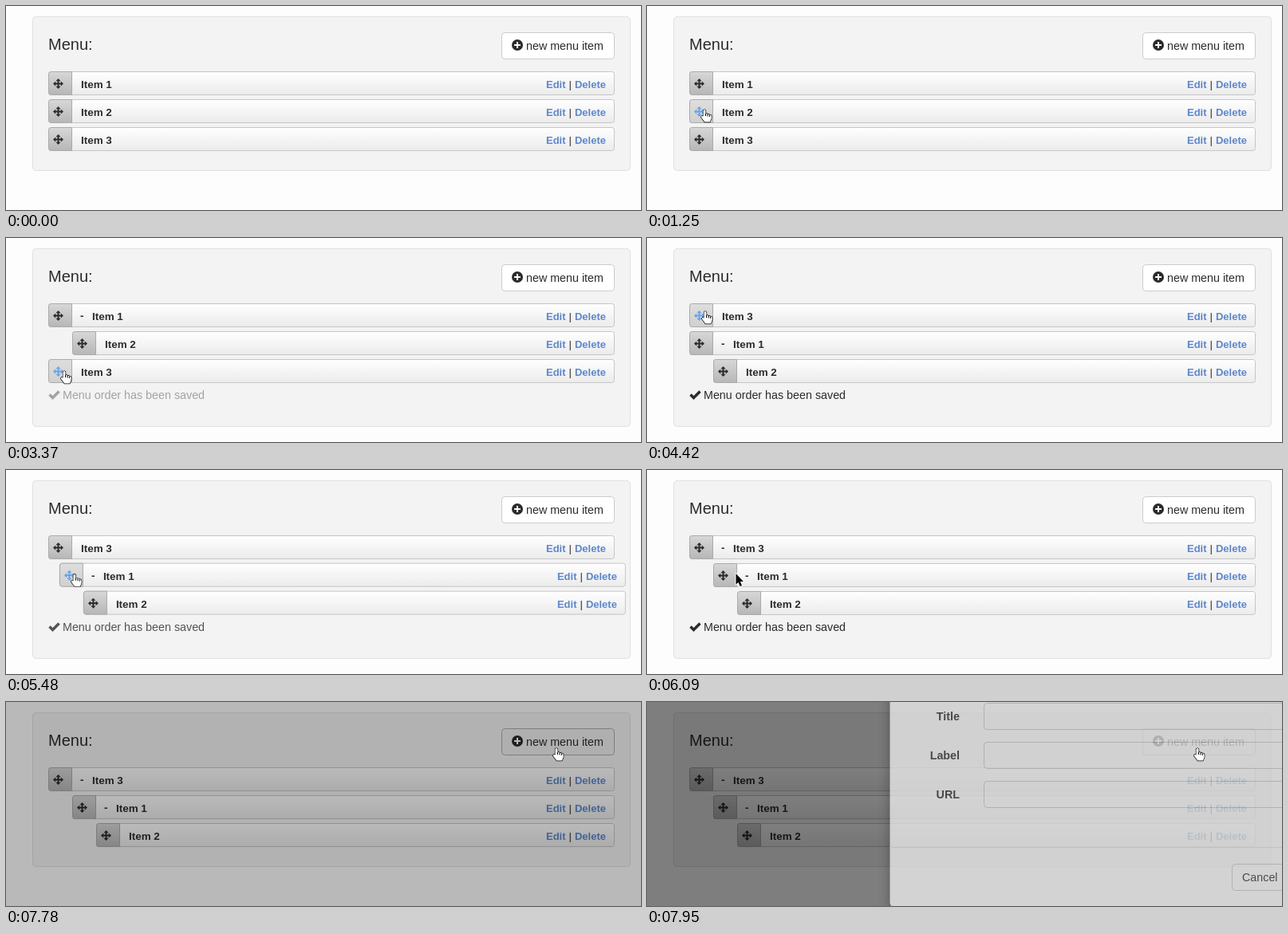
These frames come from a looping animation (796x256 px, 8000 ms). An HTML page with a canvas:

```html
<!DOCTYPE html>
<html lang="en">
<head>
<meta charset="utf-8">
<title>Sortable menu</title>
<style>
html, body { margin: 0; width: 100%; height: 100%; overflow: hidden; background: #fdfdfd; }
canvas { display: block; }
</style>
</head>
<body>
<canvas id="stage" width="796" height="256"></canvas>
<script>
const LOOP = 8000, TICK = 88.25;
const FONT = '"Liberation Sans", Arial, sans-serif';
const INK = '#2b2b2b', LINK = '#5d87cb', HOVER = '#69a5e6';
const LEFT = 53, RIGHT = 763, TOP = 82, ROW = 35, INDENT = 30;

const ARROW = new Path2D('M0 0V13.6L3 10.9 5.2 16 7.5 15 5.4 10.1H9.4Z');
const HAND = new Path2D('M-1.5 8.5V1.2Q0-1 1.5 1.2V5.3Q3.2 4.3 4 6 5.6 5 6.4 6.7 8.6 6 8.7 8.5V11L7 15.5H.3L-4.2 9.6Q-4.2 7-1.5 8.5Z');

// times in ticks
const POINTER = [
  [5, 185, 78], [6, 100, 27], [8, 100, 27], [14, 72, 130], [15, 72, 130],
  [22, 117, 128], [26, 117, 128], [32, 73, 167], [38, 73, 167],
  [43, 72, 54], [45, 72, 66], [46, 72, 66], [50, 73, 92], [55, 73, 92],
  [60, 72, 131], [65, 111.5, 130], [74, 111.5, 130], [84, 690, 58]
];
const STATUS = [
  [23, 0], [25, 1], [35, 1], [40, 0], [46, 0], [49, 1],
  [61, 1], [66, 0], [69, 1], [80, 1], [85, 0]
];
// rows: [number, depth, has children]; drag: start tick, first and last row moved
const PHASES = [
  { end: 23, rows: [[1, 0], [2, 0], [3, 0]], drag: [15, 1, 1] },
  { end: 46, rows: [[1, 0, true], [2, 1], [3, 0]], drag: [38, 2, 2] },
  { end: 66, rows: [[3, 0], [1, 0, true], [2, 1]], drag: [60, 1, 2] },
  { end: 99, rows: [[3, 0, true], [1, 1, true], [2, 2]] }
];

const clamp = (v, lo, hi) => Math.min(hi, Math.max(lo, v));
const linear = u => u;
const smooth = u => u * u * (3 - 2 * u);

function at(keys, n, ease) {
  const i = keys.findIndex(k => k[0] > n);
  if (i < 0) return keys[keys.length - 1].slice(1);
  if (i === 0) return keys[0].slice(1);
  const a = keys[i - 1], b = keys[i];
  const u = ease((n - a[0]) / (b[0] - a[0]));
  return a.slice(1).map((v, j) => v + (b[j + 1] - v) * u);
}

const stage = document.getElementById('stage');
let ctx = stage.getContext('2d');

function box(x, y, w, h, r, fill, line) {
  ctx.beginPath();
  ctx.roundRect(x + .5, y + .5, w - 1, h - 1, r);
  ctx.fillStyle = fill;
  ctx.fill();
  if (line) {
    ctx.strokeStyle = line;
    ctx.lineWidth = 1;
    ctx.stroke();
  }
}

function text(s, x, y, size, color = INK, weight = 'normal', align = 'left') {
  ctx.font = `${weight} ${size}px ${FONT}`;
  ctx.textAlign = align;
  ctx.fillStyle = color;
  ctx.fillText(s, x, y);
}

function shade(y, from, to) {
  const g = ctx.createLinearGradient(0, y, 0, y + 30);
  g.addColorStop(0, from);
  g.addColorStop(1, to);
  return g;
}

function moveIcon(x, y, color) {
  ctx.save();
  ctx.translate(x, y);
  ctx.fillStyle = color;
  for (let i = 0; i < 4; i++) {
    ctx.fillRect(-1, -5, 2, 5);
    ctx.beginPath();
    ctx.moveTo(0, -6.5);
    ctx.lineTo(3, -3.3);
    ctx.lineTo(-3, -3.3);
    ctx.fill();
    ctx.rotate(Math.PI / 2);
  }
  ctx.restore();
}

// returns true when the pointer is on the handle
function drawRow([number, depth, parent], x, y, width, pointer) {
  const dx = pointer ? pointer[0] - x : -1;
  const inside = pointer && pointer[1] >= y && pointer[1] < y + 30;
  const onHandle = inside && dx >= 0 && dx < 28;
  const onRow = inside && dx > 30 && dx < width;
  const color = onRow ? HOVER : INK, right = x + width;

  box(x, y, width, 30, 3, onRow ? '#fdfdfd' : shade(y, '#ffffff', '#ebebeb'), '#c6c6c6');
  box(x, y, 30, 30, [3, 0, 0, 3],
    onHandle ? shade(y, '#dedede', '#d0d0d0') : shade(y, '#d8d8d8', '#b6b6b6'), '#aaaaaa');
  moveIcon(x + 12.5, y + 15.5, onHandle ? HOVER : INK);
  if (parent) text('-', x + 40, y + 20, 13.4, color, 'bold');
  text('Item ' + number, x + (parent ? 55 : 41), y + 21, 13.4, color, 'bold');
  text('Edit', right - 86, y + 21, 13, LINK, 'bold');
  text('|', right - 57.5, y + 21, 13.4, color);
  text('Delete', right - 11, y + 21, 13, LINK, 'bold', 'right');
  return onHandle;
}

function drawRows(n, pointer) {
  const { rows, drag } = PHASES.find(p => n < p.end);
  const dragging = drag && n > drag[0];
  const [start, first, last] = dragging ? drag : [0, 9, 9];
  const grab = at(POINTER, start, smooth);
  const dx = dragging ? pointer[0] - grab[0] : 0;
  const dy = dragging ? pointer[1] - grab[1] : 0;
  const lifted = TOP + first * ROW + dy;
  let onHandle = false;

  const place = (row, i) => {
    const moved = i >= first && i <= last;
    const x = LEFT + row[1] * INDENT;
    let y = TOP + i * ROW;
    if (!moved && i < first && dragging && lifted < y + 15) y += ROW;
    const adopts = i === first - 1 && dx >= INDENT;
    const shown = [row[0], row[1], row[2] || adopts];
    const hit = drawRow(shown, x + (moved ? dx : 0), y + (moved ? dy : 0),
      RIGHT - x, dragging && !moved ? null : pointer);
    onHandle = onHandle || hit;
  };
  rows.forEach((row, i) => { if (i < first || i > last) place(row, i); });
  rows.forEach((row, i) => { if (i >= first && i <= last) place(row, i); });
  return onHandle;
}

function drawButton(hover) {
  box(621, 33, 142, 34, 4, hover ? '#f0f0f0' : '#ffffff', hover ? '#adadad' : '#cccccc');
  ctx.fillStyle = INK;
  ctx.beginPath();
  ctx.arc(641, 49, 7, 0, 7);
  ctx.fill();
  ctx.fillStyle = '#ffffff';
  ctx.fillRect(637, 48, 8, 2);
  ctx.fillRect(640, 45, 2, 8);
  text('new menu item', 652, 55, 14.3);
}

function drawStatus(alpha) {
  ctx.globalAlpha = alpha;
  ctx.strokeStyle = INK;
  ctx.lineWidth = 3.4;
  ctx.beginPath();
  ctx.moveTo(54.5, 196.5);
  ctx.lineTo(58.5, 200.5);
  ctx.lineTo(66.5, 192.5);
  ctx.stroke();
  text('Menu order has been saved', 71, 202, 14.3);
  ctx.globalAlpha = 1;
}

function drawPointer([x, y], hand) {
  const shape = hand ? HAND : ARROW;
  ctx.save();
  ctx.translate(x, y);
  ctx.lineJoin = 'round';
  ctx.lineWidth = hand ? 1.3 : 2;
  ctx.strokeStyle = hand ? '#000000' : '#ffffff';
  ctx.fillStyle = hand ? '#ffffff' : '#000000';
  ctx.stroke(shape);
  ctx.fill(shape);
  if (hand) {
    ctx.lineWidth = 1;
    ctx.stroke(new Path2D('M1.5 5V8M4 6V8.5M6.4 6.7V9'));
  }
  ctx.restore();
}

function makeDialog() {
  const layer = document.createElement('canvas');
  layer.width = 796;
  layer.height = 300;
  const main = ctx;
  ctx = layer.getContext('2d');
  ctx.shadowColor = 'rgba(0,0,0,.5)';
  ctx.shadowBlur = 15;
  ctx.shadowOffsetY = 5;
  box(304, -80, 600, 338, 6, '#ffffff');
  ctx.shadowColor = 'transparent';
  ['Title', 'Label', 'URL'].forEach((label, i) => {
    text(label, 392, 23 + i * 49, 14.3, '#333333', 'bold', 'right');
    box(422, 1 + i * 49, 450, 34, 4, '#ffffff', '#cccccc');
  });
  ctx.fillStyle = '#e5e5e5';
  ctx.fillRect(304, 182, 492, 1);
  box(733, 203, 72, 34, 4, '#ffffff', '#cccccc');
  text('Cancel', 746, 225, 14.3, '#333333');
  ctx = main;
  return layer;
}
const dialog = makeDialog();

function draw(n) {
  const pointer = n >= 5 ? at(POINTER, n, smooth) : null;
  const [status] = at(STATUS, n, linear);

  ctx.fillStyle = '#fdfdfd';
  ctx.fillRect(0, 0, 796, 256);
  box(33, 13, 750, status > 0 ? 224 : 194, 4, '#f3f3f3', '#e0e0e0');
  text('Menu:', 53, 55, 20);

  const onButton = pointer && pointer[0] > 621 && pointer[0] < 763 &&
    pointer[1] > 33 && pointer[1] < 67;
  drawButton(onButton);
  if (status > 0) drawStatus(status);
  const onHandle = drawRows(n, pointer);

  ctx.fillStyle = `rgba(0,0,0,${clamp((n - 86.85) * .235, 0, .5)})`;
  ctx.fillRect(0, 0, 796, 256);
  ctx.globalAlpha = clamp((n - 88.93) * .62, 0, 1);
  ctx.drawImage(dialog, 0, (n - 90) * 54);
  ctx.globalAlpha = 1;

  if (pointer) drawPointer(pointer, onButton || onHandle);
}

function frame() {
  draw(Math.floor(performance.now() % LOOP / TICK));
  requestAnimationFrame(frame);
}
frame();
</script>
</body>
</html>
```
